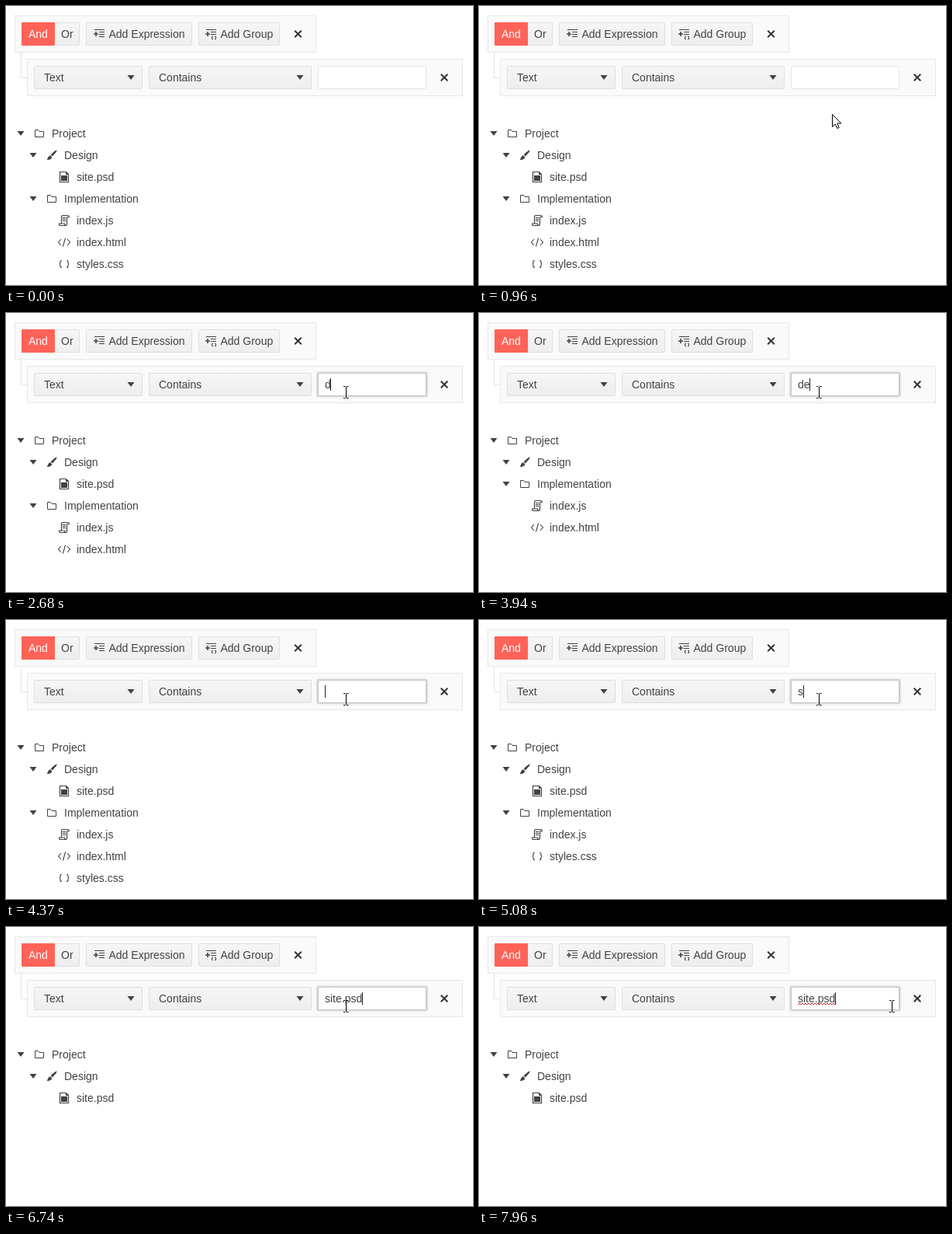
An HTML page for the animation above (8 s loop, 602 px wide and 359 px high).

```html
<!DOCTYPE html>
<html lang="en">
<head>
<meta charset="utf-8">
<title>Filter tree</title>
<style>
  html, body { margin: 0; width: 100%; height: 100%; overflow: hidden; background: #fff; }
  svg { display: block; }
  text { font: 14px "Liberation Sans", Arial, sans-serif; fill: #424242; white-space: pre; }
  .panel { fill: #fafafa; stroke: #e8e8e8; }
  .button { fill: url(#face); stroke: #dfdfdf; }
  .solid { fill: #424242; }
  .line { fill: none; stroke: #424242; }
  .cross { fill: none; stroke: #333; stroke-width: 2; }
</style>
</head>
<body>
<svg width="602" height="359" viewBox="0 0 602 359">
  <defs>
    <linearGradient id="face" x2="0" y2="1">
      <stop stop-color="#f6f6f6"/><stop offset="1" stop-color="#eeeeee"/>
    </linearGradient>
    <filter id="soft" x="-10%" y="-30%" width="120%" height="160%"><feGaussianBlur stdDeviation="1"/></filter>

    <path id="arrow" class="solid" d="M-4.5-3h9L0 3z"/>
    <path id="cross" class="cross" d="M-4.3-4.3L4.3 4.3M4.3-4.3L-4.3 4.3"/>
    <g id="add">
      <path class="line" stroke-width="1.6" d="M-7 0h6M-4-3v6"/>
      <path class="line" d="M-6-5.5H7M0-2.5h7M0 .5h7"/>
    </g>
    <path id="folder" class="line" d="M-5.5 4.5v-9h4l1.5 2h5.5v7z"/>
    <g id="brush" class="solid">
      <path d="M6.8-6.8L5.5-3.8 .9 1.6-1.4-.7 4-5.5z"/>
      <path d="M-2 .2L.3 2.5C-.2 5-3 6.3-6.6 5.8-4.7 4.6-5.2 1-2 .2z"/>
    </g>
    <g id="image">
      <path class="line" stroke-width="1.2" d="M-5.5-6.5h8l3 3v10h-11z"/>
      <path class="solid" d="M2-7v4h4zM-4-2h8v7h-8z"/>
    </g>
    <g id="script">
      <path class="line" stroke-width="1.2" d="M-3.5 3.5v-8q0-2 2-2h6.5q1.5 0 1.5 2h-3M3.5-4.5v9q0 2-2 2h-6.5q-1.5 0-1.5-2.5h7q0 2.5 1.5 2.5"/>
      <path class="line" d="M-2-3.5h4M-2-1.5h4M-2 .5h4"/>
    </g>
    <path id="markup" class="line" stroke-width="1.1" d="M-4-4L-7.5 0-4 4M4-4L7.5 0 4 4M1.6-5.5L-1.6 5.5"/>
    <path id="braces" class="line" stroke-width="1.2" d="M-3-4.5q-2 0-2 2v1q0 1.5-1.5 1.5 1.5 0 1.5 1.5v1q0 2 2 2M3-4.5q2 0 2 2v1Q5 0 6.5 0 5 0 5 1.5v1q0 2-2 2"/>
  </defs>

  <path fill="none" stroke="#e4e4e4" d="M19.5 60V92.5H27"/>
  <rect class="panel" x="11.5" y="12.5" width="388" height="47"/>
  <rect class="panel" x="27.5" y="68.5" width="561" height="47"/>

  <rect class="button" x="62.5" y="21.5" width="32" height="29" rx="1"/>
  <rect fill="#ff6358" x="20" y="21" width="43" height="30" rx="1"/>
  <text x="29" y="41" style="fill:#fff">And</text>
  <text x="71" y="41">Or</text>

  <rect class="button" x="103.5" y="21.5" width="136" height="29" rx="1"/>
  <use href="#add" x="120" y="36"/>
  <path class="line" d="M120 39.5h7"/>
  <text x="132.5" y="41">Add Expression</text>

  <rect class="button" x="248.5" y="21.5" width="104" height="29" rx="1"/>
  <use href="#add" x="264" y="36"/>
  <path class="line" d="M267 39.5h-1.5v3h1.5M269 39.5h1.5v3h-1.5"/>
  <text x="276.5" y="41">Add Group</text>
  <use href="#cross" x="376.5" y="36"/>

  <rect class="button" x="36.5" y="77.5" width="139" height="29" rx="1"/>
  <text x="49" y="97">Text</text>
  <use href="#arrow" x="161" y="92"/>
  <rect class="button" x="184.5" y="77.5" width="209" height="29" rx="1"/>
  <text x="197" y="97">Contains</text>
  <use href="#arrow" x="379" y="92"/>
  <use href="#cross" x="565" y="92"/>

  <rect id="glow" x="401" y="76.5" width="142" height="31" fill="#bbb" filter="url(#soft)"/>
  <rect id="field" x="402.5" y="77.5" width="139" height="29" rx="1" fill="#fff"/>
  <text id="query" x="411" y="97"></text>
  <path id="squiggle" fill="none" stroke="#d22c2c"/>
  <rect id="caret" y="84" width="1" height="16" fill="#222"/>

  <g id="tree"></g>

  <circle id="click" cx="437" cy="102" r="12" fill="#ffff52" opacity=".85"/>
  <path id="pointer" fill="#fff" stroke="#000" d="M.5.5V16.5L4.2 13 6.7 18.5 9.2 17.4 6.8 12H11.8z"/>
  <path id="beam" fill="none" stroke="#000" d="M-3-7.5h2.5M1-7.5h2.5M.5-7V7M-3 7.5h2.5M1 7.5h2.5"/>
</svg>

<script>
const LOOP = 8000;
const $ = id => document.getElementById(id);

// [level, icon, label]
const items = [
  [0, 'folder', 'Project'],
  [1, 'brush', 'Design'],
  [2, 'image', 'site.psd'],
  [1, 'folder', 'Implementation'],
  [2, 'script', 'index.js'],
  [2, 'markup', 'index.html'],
  [2, 'braces', 'styles.css']
];

// [start time, query, caret visible]
const typing = [
  [0, '', 0], [1530, '', 1], [2010, '', 0], [2610, '', 1],
  [2680, 'd', 1], [2930, 'de', 1], [3440, 'de', 0], [3940, 'de', 1],
  [4170, 'd', 1], [4370, '', 1], [4520, '', 0], [5030, '', 1],
  [5080, 's', 1], [5290, 'si', 1], [5570, 'sit', 1], [5640, 'site', 1],
  [6160, 'site', 0], [6290, 'site.', 1], [6540, 'site.p', 1],
  [6640, 'site.ps', 1], [6740, 'site.psd', 1], [7270, 'site.psd', 0],
  [7830, 'site.psd', 1]
];

const show = (node, on) => node.setAttribute('visibility', on ? 'visible' : 'hidden');
const moveTo = (node, x, y) => node.setAttribute('transform', `translate(${x} ${y})`);

// A row stays while it, or anything nested under it, contains the query.
function isKept(index, query) {
  const [level, , label] = items[index];
  if (label.toLowerCase().includes(query)) return true;
  for (let i = index + 1; i < items.length && items[i][0] > level; i++) {
    if (items[i][2].toLowerCase().includes(query)) return true;
  }
  return false;
}

const rows = items.map(([level, icon, label]) => {
  const row = document.createElementNS('http://www.w3.org/2000/svg', 'g');
  const x = 16 * level;
  row.innerHTML = (level < 2 ? `<use href="#arrow" x="${x + 19}"/>` : '') +
    `<use href="#${icon}" x="${x + 43}"/><text x="${x + 59}" y="5">${label}</text>`;
  $('tree').append(row);
  return row;
});

let wave = 'M411 100';
for (let x = 413, up = true; x <= 459; x += 2, up = !up) wave += `L${x} ${up ? 98 : 100}`;
$('squiggle').setAttribute('d', wave);

function cursorAt(t) {
  if (t >= 7960) return [532, 102];
  if (t >= 1660) return [438, 102];
  if (t >= 1310) return [439, 103];
  const p = Math.min(1, Math.floor((t - 600) / 70) / 8);
  const left = (1 - p) ** 2;
  return [Math.round(439 + 113 * left), Math.round(105 + 239 * left)];
}

let shownQuery = null;
function showQuery(query) {
  if (query === shownQuery) return;
  shownQuery = query;
  $('query').textContent = query;
  const width = query ? $('query').getComputedTextLength() : 0;
  $('caret').setAttribute('x', Math.floor(411 + width));
  let y = 164;
  rows.forEach((row, i) => {
    const kept = isKept(i, query);
    show(row, kept);
    if (!kept) return;
    moveTo(row, 0, y);
    y += 28;
  });
}

function render(t) {
  const [, query, caret] = typing.findLast(step => step[0] <= t);
  showQuery(query);
  show($('caret'), caret);
  show($('squiggle'), t >= 7960);

  const [x, y] = cursorAt(t);
  const present = t >= 600;
  const overField = y < 107;
  const focused = t >= 1530;
  show($('pointer'), present && !overField);
  show($('beam'), present && overField);
  moveTo($('pointer'), x, y);
  moveTo($('beam'), x, y);
  show($('click'), t >= 1530 && t < 1660);
  show($('glow'), focused);
  $('field').setAttribute('stroke', focused ? '#c6c6c6' : present && overField ? '#d4d4d4' : '#e6e6e6');
}

const start = performance.now();
function tick() {
  render((performance.now() - start) % LOOP);
  requestAnimationFrame(tick);
}
tick();
</script>
</body>
</html>
```
